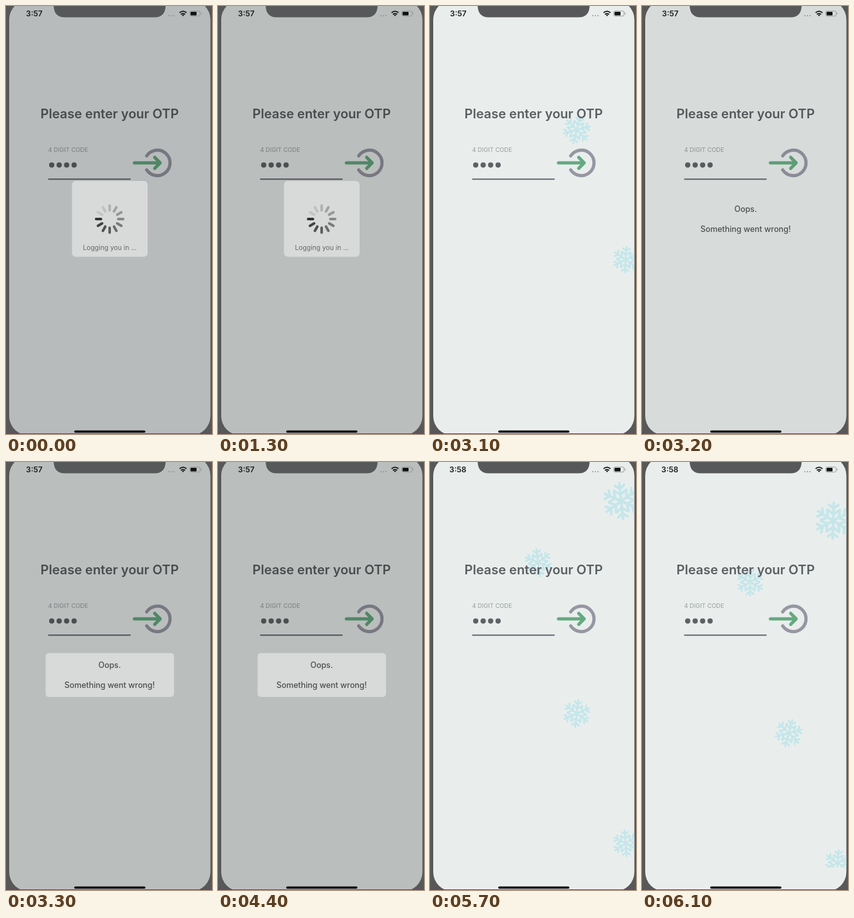
An HTML page for the animation above (6200 ms loop, 320 by 663 pixels).

```html
<!DOCTYPE html>
<html lang="en">
<head>
<meta charset="utf-8">
<title>OTP login</title>
<style>
  html, body { margin: 0; width: 100%; height: 100%; overflow: hidden; background: #585858; }
  svg { display: block; width: 100vw; height: 100vh; font-family: Inter, Roboto, sans-serif; }
  .line { fill: none; stroke-linecap: round; stroke-linejoin: round; }
  .mid { text-anchor: middle; }
</style>
</head>
<body>
<svg viewBox="0 0 320 663">
  <defs>
    <clipPath id="screen"><rect x="5" y="-9" width="312.5" height="674" rx="30"/></clipPath>
    <clipPath id="sky"><rect x="5" width="312.5" height="628"/></clipPath>
    <g id="arm"><path d="M0 0V-1M-.26-.88L0-.68L.26-.88M-.33-.6L0-.36L.33-.6"/></g>
    <g id="flake" class="line" stroke="#c5e6ea" stroke-width=".14"></g>
  </defs>

  <rect width="320" height="663" fill="#585858"/>
  <g clip-path="url(#screen)">
    <rect width="320" height="663" fill="#e9eeed"/>
    <g id="snow" clip-path="url(#sky)"></g>

    <text class="mid" x="161" y="174" font-size="20" font-weight="600" fill="#5b5e60">Please enter your OTP</text>
    <text x="65.5" y="226" font-size="9.3" fill="#989c9d">4 DIGIT CODE</text>
    <path class="line" d="M71 246.3h35" stroke="#5f6264" stroke-width="8.2" stroke-dasharray="0 11.6"/>
    <path d="M65.5 268.2h128" stroke="#686772" stroke-width="2"/>
    <path class="line" d="M218.6 232.2A19.7 19.7 0 1 1 218.6 253.8" stroke="#9796a2" stroke-width="5"/>
    <path class="line" d="M199.5 243H239M231 234.5L239.5 243L231 251.5" stroke="#65a980" stroke-width="5"/>

    <rect id="dim" width="320" height="663"/>

    <text id="clock" x="31" y="16" font-size="12" font-weight="600" fill="#1c1d1d"></text>
    <path class="line" d="M253 15h12" stroke="#8b8e8e" stroke-width="1.8" stroke-dasharray="0 4"/>
    <g class="line" stroke="#111" stroke-width="1.8" style="stroke-linecap:butt">
      <path d="M269.6 10.4Q275 5.8 280.4 10.4M271.7 13Q275 10.2 278.3 13"/>
      <path d="M273.2 13.9L275 16L276.8 13.9Q275 12.6 273.2 13.9Z" fill="#111" stroke="none"/>
    </g>
    <rect x="285.5" y="7.8" width="16" height="7.8" rx="2.2" fill="none" stroke="#8f9292" stroke-width=".9"/>
    <rect x="286.7" y="9" width="9.3" height="5.4" rx="1" fill="#111"/>
    <path d="M303.3 10.2v3" stroke="#999c9c"/>

    <rect id="loadBox" x="102.5" y="271" width="117.5" height="117.5" rx="6" fill="#d8dad9"/>
    <g id="loading">
      <g id="spinner" class="line" stroke="#333" stroke-width="4" transform="translate(161 330)"></g>
      <text class="mid" x="161.3" y="378" font-size="10.3" fill="#666">Logging you in ...</text>
    </g>

    <rect id="errorBox" x="61.5" y="296" width="199.5" height="68" rx="5" fill="#d8dad9"/>
    <g id="error" class="mid" font-size="12.4" font-weight="500" fill="#4c4e4e">
      <text x="161" y="319.3">Oops.</text>
      <text x="161" y="350">Something went wrong!</text>
    </g>
    <rect x="106" y="657.5" width="110.5" height="3.4" rx="1.7" fill="#0c0c0c"/>
  </g>
  <path d="M74 0Q75 17.5 91 17.5H231Q247 17.5 248 0Z" fill="#575859"/>
  <path d="M0 662.5H320" stroke="#147d14"/>
</svg>
<script>
const LOOP = 6200, STEP = 100, SPIN = 1270, FALL = 0.076, SPOKES = 12;
const $ = id => document.getElementById(id);

function add(parent, tag, attrs) {
  const el = document.createElementNS("http://www.w3.org/2000/svg", tag);
  for (const k in attrs) el.setAttribute(k, attrs[k]);
  return parent.appendChild(el);
}

// Linear interpolation through [time, value] pairs
function track(t, keys) {
  const i = keys.findIndex(k => k[0] > t);
  if (i < 0) return keys[keys.length - 1][1];
  if (i === 0) return keys[0][1];
  const [t0, v0] = keys[i - 1], [t1, v1] = keys[i];
  return v0 + (v1 - v0) * (t - t0) / (t1 - t0);
}

for (let i = 0; i < 6; i++) add($("flake"), "use", { href: "#arm", transform: `rotate(${i * 60})` });

// x, resting y, size and angle at the end of the loop
const flakes = [[297, 91, 28, 2], [168, 186, 21, 0], [228, 420, 21, 15], [304, 621, 20, 4]]
  .map(([x, y, size, angle]) => ({ x, y, size, angle, el: add($("snow"), "use", { href: "#flake" }) }));

const spokes = Array.from({ length: SPOKES }, (_, i) =>
  add($("spinner"), "path", { d: "M0-13.5V-21", transform: `rotate(${i * 360 / SPOKES})` }));

const dimKeys = [[0, .21], [500, .2], [2500, .2], [2600, .15], [2700, .07], [2800, .02], [2900, 0],
  [3100, 0], [3200, .075], [3300, .2], [4900, .2], [5000, .15], [5100, .07], [5200, .02], [5300, 0]];
const opacityKeys = {
  loadBox: [[2500, 1], [2600, 0]],
  loading: [[2500, 1], [2600, .5], [2700, .2], [2800, 0]],
  errorBox: [[3200, 0], [3300, 1], [4900, 1], [5000, 0]],
  error: [[3100, 0], [3200, 1], [4900, 1], [5000, .55], [5100, .28], [5200, 0]]
};

function draw(now) {
  const t = Math.floor(now % LOOP / STEP) * STEP;
  const dim = track(t, dimKeys);
  $("dim").setAttribute("opacity", dim);
  for (const id in opacityKeys) $(id).setAttribute("opacity", track(t, opacityKeys[id]));

  $("clock").textContent = t < 5400 ? "3:57" : "3:58";
  $("clock").setAttribute("x", t < 5400 ? 31 : 30);

  const head = 9 + Math.floor(.5 + t / SPIN * SPOKES);
  spokes.forEach((spoke, i) => {
    const age = (head - i + SPOKES * 10) % SPOKES;
    spoke.setAttribute("opacity", Math.max(.12, 1 - age * .085));
  });

  $("snow").setAttribute("opacity", Math.max(0, 1 - dim / .07));
  const left = LOOP - STEP - t;
  for (const f of flakes)
    f.el.setAttribute("transform",
      `translate(${f.x} ${f.y - left * FALL}) rotate(${f.angle - left * .02}) scale(${f.size})`);
}

function loop() {
  draw(performance.now());
  requestAnimationFrame(loop);
}
loop();
</script>
</body>
</html>
```
